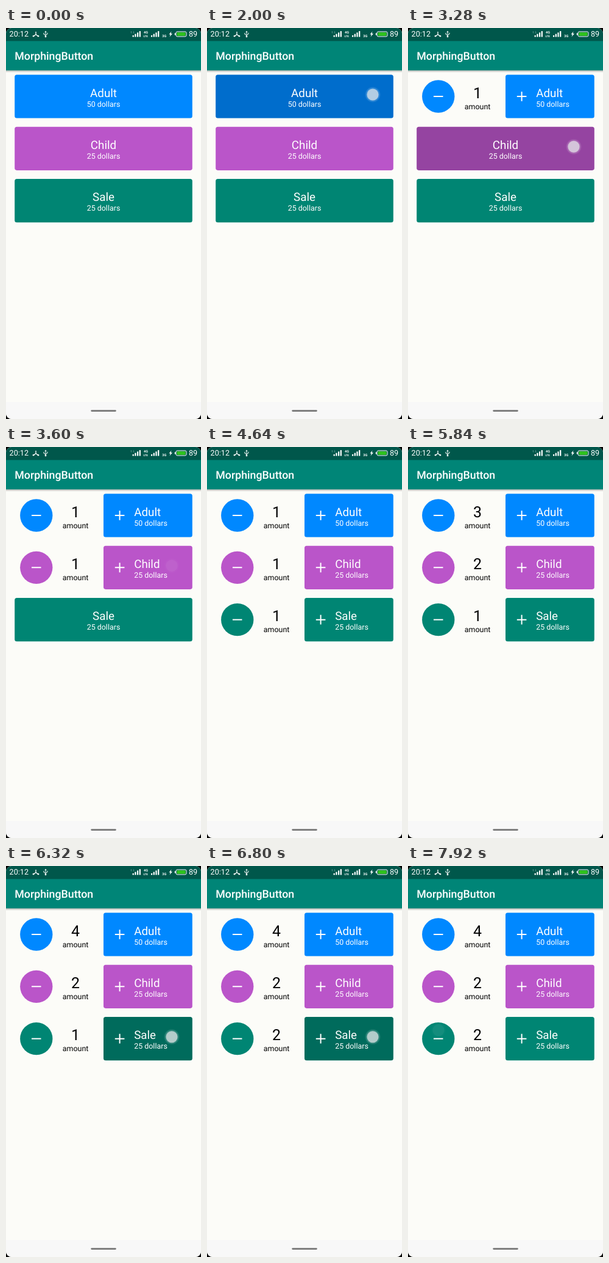
An HTML page that plays this animation: 320 px wide and 640 px high, repeating every 8 s.

```html
<!DOCTYPE html>
<html lang="en">
<head>
<meta charset="utf-8">
<title>MorphingButton</title>
<style>
  html, body { margin: 0; width: 100%; height: 100%; overflow: hidden; background: #000; }
  svg { display: block; width: 100vw; height: 100vh; font-family: Roboto, sans-serif; text-rendering: geometricPrecision; }
  .title { font-size: 18.8px; fill: #fff; }
  .price { font-size: 12.44px; fill: #fff; }
  .count { font-size: 24.9px; text-anchor: middle; }
  .amount { font-size: 12.44px; text-anchor: middle; }
  .sign { stroke: #fff; stroke-width: 2; fill: none; }
  .clock { font-size: 12.6px; }
  .tiny { font-size: 5.5px; font-weight: 700; }
</style>
</head>
<body>
<svg viewBox="0 0 320 640">
  <defs>
    <linearGradient id="shadow" x2="0" y2="1">
      <stop offset="0" stop-opacity=".3"/>
      <stop offset="1" stop-opacity="0"/>
    </linearGradient>
    <radialGradient id="halo">
      <stop offset=".7" stop-color="#fff" stop-opacity=".3"/>
      <stop offset="1" stop-color="#fff" stop-opacity="0"/>
    </radialGradient>
    <clipPath id="screen"><rect width="320" height="640" rx="9"/></clipPath>
  </defs>
  <g clip-path="url(#screen)">
    <rect width="320" height="640" fill="#fcfcf8"/>
    <rect y="612" width="320" height="28" fill="#f8f8f8"/>
    <rect x="139.3" y="625.2" width="41.5" height="2.8" rx="1.4" fill="#777"/>
    <rect y="69" width="320" height="4" fill="url(#shadow)"/>
    <rect y="20" width="320" height="49.33" fill="#008577"/>
    <rect width="320" height="21.33" fill="#00574b"/>
    <text x="14.2" y="51.6" font-size="17.8" font-weight="500" fill="#fff">MorphingButton</text>

    <g id="status" fill="#fff">
      <text class="clock" x="5.6" y="14.4">20:12</text>
      <path d="M49 6v4.5l-4 3.2M49 10.5l4 3.2" stroke="#fff" stroke-width="1.3" fill="none"/>
      <circle cx="45" cy="13.2" r="1.3"/><circle cx="53" cy="13.2" r="1.3"/>
      <path d="M65 6v8M62 8v2.2l3 2M68 7.8v2l-3 2" stroke="#fff" fill="none"/>
      <path d="M63.4 7l1.6-2.6L66.6 7z"/><circle cx="65" cy="14" r="1.4"/>
      <path id="upload" d="M205.5 5l1.5 2h-1v2h-1V7h-1z"/>
      <path id="download" d="M209.5 9l1.5-2h-1V5h-1v2h-1z"/>
      <text class="tiny" x="226" y="9.3">4G</text>
      <text class="tiny" x="225.5" y="15" style="font-size:4.5px">LTE</text>
      <text class="tiny" x="256.3" y="15">3G</text>
      <path d="M271.5 5.5l-4 5h2.3l-1.3 4 4.5-5.3h-2.5z"/>
      <rect x="279" y="6" width="17" height="8" rx="2" fill="none" stroke="#fff"/>
      <rect x="276.8" y="8.3" width="1.7" height="3.4" rx=".6"/>
      <rect x="280.5" y="7.3" width="14" height="5.4" rx="1" fill="#2fc41c"/>
      <text class="clock" x="300" y="14.4">89</text>
    </g>
    <g id="rows"></g>
    <g id="touch">
      <circle r="13" fill="url(#halo)"/>
      <circle r="9.5" fill="#e4e6e8" fill-opacity=".68"/>
    </g>
  </g>
</svg>
<script>
const LOOP = 8000, STEP = 80;
const ROW_GAP = 85.33, LEFT = 14.22, RIGHT = 305.78, MIDDLE = 160;
const PLUS_SPOT = { x: 272, y: 109 }, MINUS_SPOT = { x: 50, y: 98 };
const BUSY_FROM = 4640;

const $ = id => document.getElementById(id);
const lerp = (a, b, p) => a + (b - a) * p;
const clamp = p => Math.min(1, Math.max(0, p));

function set(el, attrs) {
  for (const key in attrs) el.setAttribute(key, attrs[key]);
}
function add(parent, tag, attrs, text) {
  const el = document.createElementNS("http://www.w3.org/2000/svg", tag);
  set(el, attrs);
  if (text) el.textContent = text;
  return parent.appendChild(el);
}

const press = (down, up) => ({ down, up, change: 1 });
const pressMinus = (down, up) => ({ down, up, change: -1 });

const rows = [
  makeRow(0, "Adult", "50 dollars", "#0088ff",
    [press(2000, 2080), press(5200, 5360), press(5520, 5680), press(5920, 6000)]),
  makeRow(1, "Child", "25 dollars", "#ba55c9",
    [press(3280, 3520), press(4800, 4880)]),
  makeRow(2, "Sale", "25 dollars", "#008573",
    [press(4160, 4320), press(6320, 6560), press(6720, 6880), pressMinus(7760, 7840)])
];

function makeRow(index, name, price, fill, taps) {
  const top = index * ROW_GAP;
  const g = add($("rows"), "g", { transform: `translate(0 ${top})` });

  const side = add(g, "g", {});
  const disc = { cx: 49.78, cy: 112, r: 26.67 };
  add(side, "circle", { ...disc, fill });
  const minusShade = add(side, "circle", disc);
  add(side, "path", { class: "sign", d: "M42 112h15.5" });
  const count = add(side, "text", { class: "count", x: 114.1, y: 114.6 });
  add(side, "text", { class: "amount", x: 114.1, y: 132.6 }, "amount");

  const box = { y: 76.44, height: 71.11, rx: 3.56 };
  const button = add(g, "rect", { ...box, fill });
  const shade = add(g, "rect", box);
  const plus = add(g, "path", { class: "sign", d: "M178.8 112h15.6M186.6 104.2v15.6" });
  const labels = [
    add(g, "text", { class: "title", y: 112.7 }, name),
    add(g, "text", { class: "price", y: 128.6 }, price)
  ];
  return { top, taps, side, minusShade, count, button, shade, plus, labels };
}

function addBars(x) {
  for (let i = 0; i < 4; i++) {
    const height = 2.6 + i * 2.3;
    add($("status"), "rect", { x: x + i * 3.7, y: 14.6 - height, width: 2.2, height });
  }
}
addBars(207.6);
addBars(238);

function drawRow({ taps, side, minusShade, count, button, shade, plus, labels }, t) {
  const amount = taps.reduce((sum, tap) => sum + (tap.up <= t ? tap.change : 0), 0);
  const held = taps.find(tap => tap.down <= t && t < tap.up);
  const p = clamp((t - taps[0].up + STEP) / (2 * STEP));
  const x = lerp(LEFT, MIDDLE, p);
  const span = { x, width: RIGHT - x };

  set(button, span);
  set(shade, { ...span, opacity: held?.change > 0 ? .2 : 0 });
  set(minusShade, { opacity: held?.change < 0 ? .2 : 0 });
  set(side, { opacity: p });
  set(plus, { opacity: p });
  count.textContent = amount;
  for (const label of labels) {
    const centred = MIDDLE - label.getComputedTextLength() / 2;
    set(label, { x: lerp(centred, 210.2, p) });
  }
}

// The mark is solid while held, then fades within two steps.
function drawTouch(t) {
  set($("touch"), { opacity: 0 });
  for (const { top, taps } of rows) {
    const tap = taps.find(tap => tap.down <= t && t < tap.up + 2 * STEP);
    if (!tap) continue;
    const { x, y } = tap.change > 0 ? PLUS_SPOT : MINUS_SPOT;
    const opacity = t < tap.up ? 1 : .3 * .35 ** ((t - tap.up) / STEP);
    set($("touch"), { opacity, transform: `translate(${x} ${y + top})` });
  }
}

function noise(n) {
  const v = Math.sin(n * 12.9898) * 43758.5453;
  return v - Math.floor(v);
}

// Data arrows light up at random once the line is busy.
function drawArrow(el, t, seed) {
  const lit = t >= BUSY_FROM && noise(t / STEP + seed) > .85;
  set(el, { opacity: lit ? .9 : .25 });
}

function draw(now) {
  const t = Math.floor((now % LOOP) / STEP) * STEP;
  for (const row of rows) drawRow(row, t);
  drawTouch(t);
  drawArrow($("upload"), t, 1);
  drawArrow($("download"), t, 500);
}

let start;
function tick(now) {
  start ??= now;
  draw(Math.max(0, now - start));
  requestAnimationFrame(tick);
}
draw(0);
requestAnimationFrame(tick);
</script>
</body>
</html>
```
